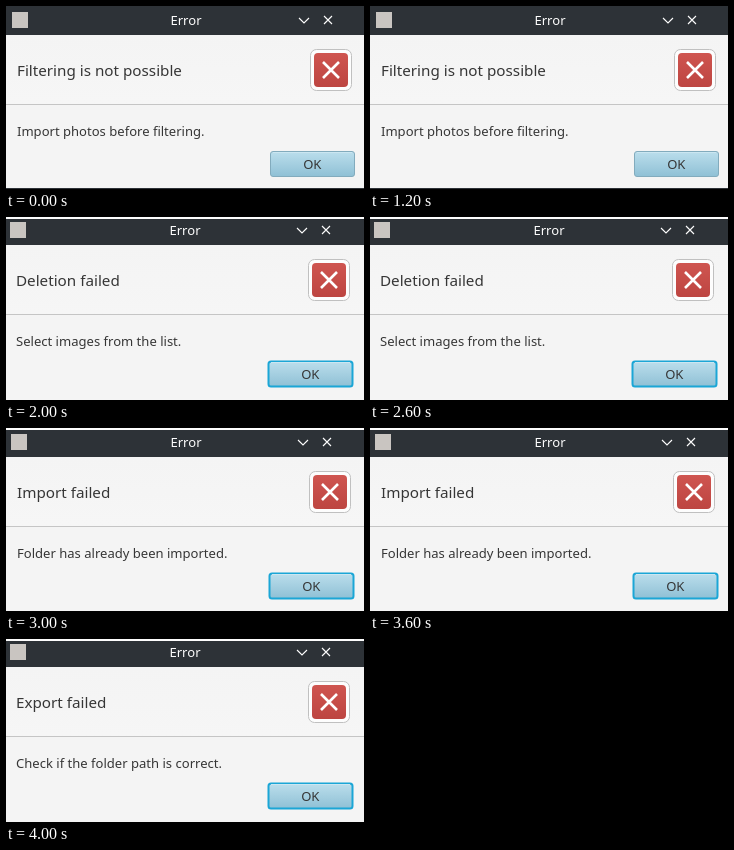
An HTML page that plays this animation: 358 by 183 pixels, repeating every 5000 ms.

```html
<!DOCTYPE html>
<html lang="en">
<head>
<meta charset="utf-8">
<title>Error dialogs</title>
<style>
  html, body { margin: 0; width: 100%; height: 100%; overflow: hidden; background: #f4f4f4; }
  svg { display: block; width: 100vw; height: 100vh; }
  text { font-family: "Noto Sans", "Open Sans", sans-serif; font-size: 13.05px; fill: #363636; white-space: pre; }
  .mid { text-anchor: middle; }
  .line { fill: none; stroke: #fcfcfc; stroke-width: 1.1; }
</style>
</head>
<body>
<svg viewBox="0 0 358 183">
  <defs>
    <linearGradient id="head" x2="0" y2="1">
      <stop stop-color="#f4f4f4"/><stop offset="1" stop-color="#f6f6f6"/>
    </linearGradient>
    <linearGradient id="plain" x2="0" y2="1">
      <stop stop-color="#bbdeec"/><stop offset="1" stop-color="#8fc0d5"/>
    </linearGradient>
    <linearGradient id="red" x2="0" y2="1">
      <stop stop-color="#cf5550"/><stop offset="1" stop-color="#bd4541"/>
    </linearGradient>
  </defs>
  <rect width="358" height="183" fill="#f4f4f4"/>
  <g id="panel">
    <rect x="-4" y="-4" width="370" height="33" fill="#2d3237"/>
    <rect x="6" y="6" width="16" height="16" fill="#c9c5c1"/>
    <path class="line" d="M293 12l5 5 5-5M318 10l8 8M326 10l-8 8"/>

    <rect x="-4" y="29" width="370" height="69" fill="url(#head)"/>
    <rect x="-4" y="98" width="370" height="1" fill="#c5c5c5"/>
    <rect x="304.5" y="43.5" width="41" height="41" rx="6" fill="#fdfdfd" stroke="#c0c0c0"/>
    <rect x="308" y="47" width="34" height="34" rx="4" fill="url(#red)"/>
    <path d="M317 56l16 16M333 56l-16 16" fill="none" stroke="#fff" stroke-width="2.6"/>

    <rect id="button" x="264.5" y="145.5" width="84" height="25" rx="2.5" fill="url(#plain)"/>
    <path d="M267 146.5h79" stroke="#cbe6f1"/>
    <text class="mid" x="306.3" y="163">OK</text>
  </g>
  <g id="words">
    <text class="mid" x="180" y="19" style="fill:#fcfcfc">Error</text>
    <text id="heading" x="11" y="70" style="font-size:15.22px"></text>
    <text id="message" x="11" y="130"></text>
  </g>
  <rect id="strip" width="358" height="2" fill="#fdfdfd"/>
  <rect id="base" y="182" width="358" height="1" fill="#2d3237"/>
</svg>
<script>
  const LOOP = 5000;
  const scenes = [
    { at: 0, x: 0, y: 0, textX: 0, heading: "Filtering is not possible", message: "Import photos before filtering." },
    { at: 2000, x: -2, y: -1, textX: -1, focus: true, heading: "Deletion failed", message: "Select images from the list." },
    { at: 3000, x: -1, y: 0, textX: 0, focus: true, heading: "Import failed", message: "Folder has already been imported." },
    { at: 4000, x: -2, y: -1, textX: -1, focus: true, heading: "Export failed", message: "Check if the folder path is correct." }
  ];
  const el = id => document.getElementById(id);
  const show = (id, on) => el(id).style.display = on ? "" : "none";
  const move = (id, x, y) => el(id).setAttribute("transform", `translate(${x} ${y})`);
  let shown;

  function draw(time) {
    const t = time % LOOP;
    const scene = scenes.filter(s => s.at <= t).pop();
    if (scene === shown) return;
    shown = scene;
    move("panel", scene.x, scene.y);
    move("words", scene.textX, scene.y);
    el("heading").textContent = scene.heading;
    el("message").textContent = scene.message;
    el("button").setAttribute("stroke", scene.focus ? "#1ba6d6" : "#82abbd");
    el("button").setAttribute("stroke-width", scene.focus ? 2 : 1);
    show("strip", scene.focus);
    show("base", !scene.focus);
  }

  const start = performance.now();
  function tick() {
    draw(performance.now() - start);
    requestAnimationFrame(tick);
  }
  tick();
</script>
</body>
</html>
```
